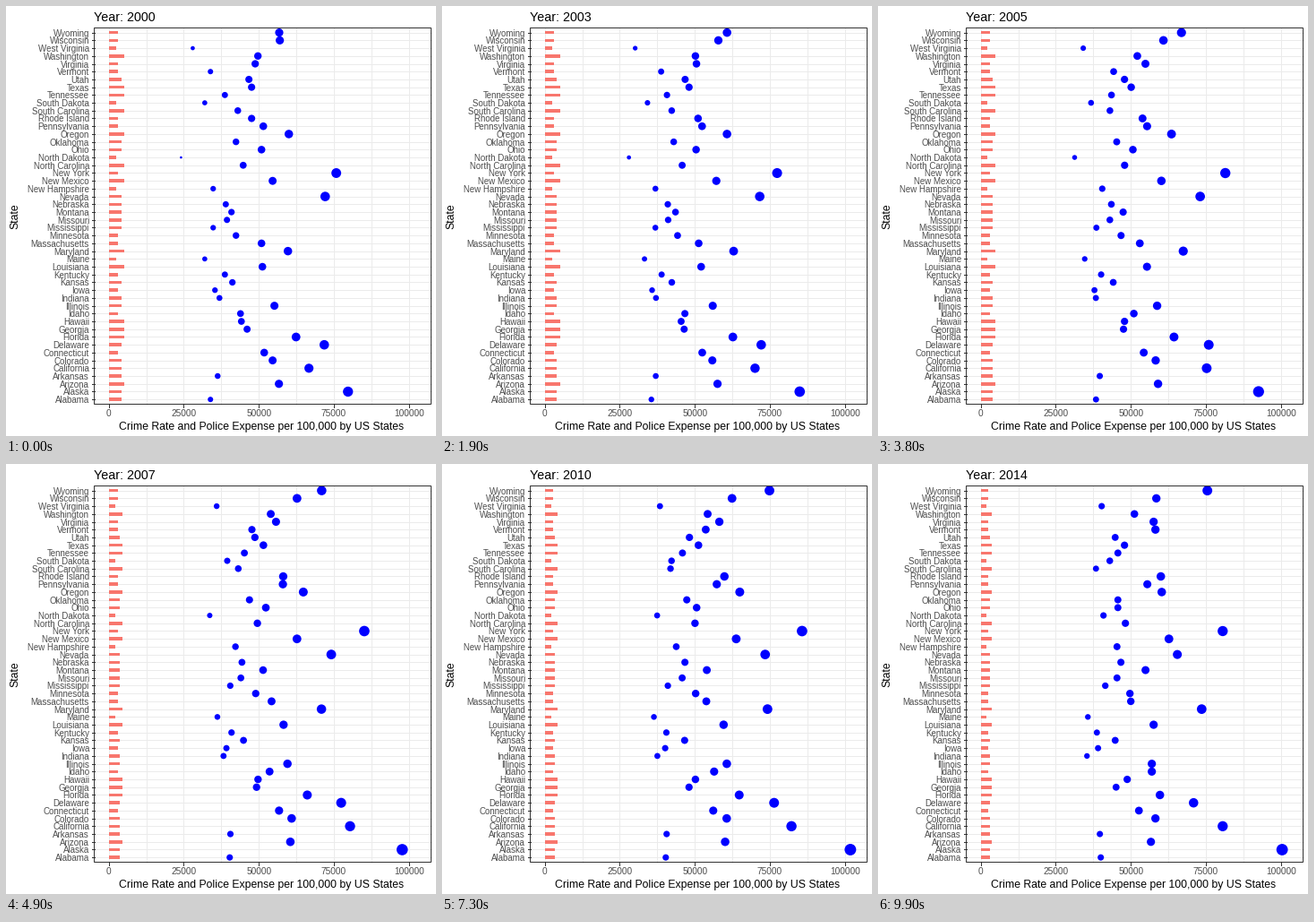
A matplotlib script that plays this animation: 480x480 px, repeating every 10000 ms.

```python
import numpy as np
import matplotlib.pyplot as plt
from matplotlib.animation import FuncAnimation
from matplotlib.patches import Rectangle

plt.rcParams["font.family"] = "Liberation Sans"

SIZE, DPI, FRAMES = 480, 72, 100
FIRST, LAST = 2000, 2014
SPAN = LAST - FIRST
LEFT, RIGHT, TOP, BOTTOM = 98.5, 474.5, 24.5, 444.5
ZERO, PER_K = 114.6, 3.352  # stage position of 0, pixels per thousand
LOW, HIGH = 24, 102         # range of the point size scale
GRID, DARK, LABEL = "#EBEBEB", "#333333", "#4D4D4D"

# Police expense in thousands: first and last year
EXPENSE = {
    "Wyoming": (56.8, 75.5), "Wisconsin": (57, 58.5), "West Virginia": (28, 40.3),
    "Washington": (49.7, 51.2), "Virginia": (48.8, 57.6), "Vermont": (33.9, 58.2),
    "Utah": (46.7, 44.8), "Texas": (47.6, 47.9), "Tennessee": (38.7, 45.7),
    "South Dakota": (32, 43), "South Carolina": (43, 38.4), "Rhode Island": (47.6, 60),
    "Pennsylvania": (51.5, 55.5), "Oregon": (60, 60.3), "Oklahoma": (42.4, 45.7),
    "Ohio": (50.9, 45.7), "North Dakota": (24.1, 40.9), "North Carolina": (44.8, 48.2),
    "New York": (75.8, 80.6), "New Mexico": (54.6, 62.7), "New Hampshire": (34.8, 45.4),
    "Nevada": (72.1, 65.5), "Nebraska": (39, 46.7), "Montana": (40.9, 54.9),
    "Missouri": (39.4, 45.4), "Mississippi": (34.8, 41.5), "Minnesota": (42.4, 49.7),
    "Massachusetts": (50.9, 50), "Maryland": (59.7, 73.6), "Maine": (32, 35.7),
    "Louisiana": (51.2, 57.6), "Kentucky": (38.7, 38.7), "Kansas": (41.2, 44.8),
    "Iowa": (35.4, 39.1), "Indiana": (36.9, 35.4), "Illinois": (55.2, 57),
    "Idaho": (43.9, 57), "Hawaii": (44.2, 48.8), "Georgia": (46.1, 45.1),
    "Florida": (62.4, 59.7), "Delaware": (71.8, 70.9), "Connecticut": (51.8, 52.7),
    "Colorado": (54.6, 58.2), "California": (66.7, 80.6), "Arkansas": (36.3, 39.7),
    "Arizona": (56.7, 56.7), "Alaska": (79.7, 100.4), "Alabama": (33.9, 40),
}
STATES = list(EXPENSE)

# Crime rate in thousands at the start, by tier; all others are average
AVERAGE = 4.2
TIERS = {
    2.4: "West Virginia, South Dakota, North Dakota, New Hampshire, Maine",
    3.2: "Wyoming, Wisconsin, Virginia, Vermont, Rhode Island, Pennsylvania, New York, "
         "Minnesota, Massachusetts, Kentucky, Iowa, Idaho, Connecticut",
    5.2: "Washington, Texas, Tennessee, South Carolina, Oregon, North Carolina, "
         "New Mexico, Maryland, Louisiana, Hawaii, Georgia, Florida, Arizona",
}
CRIME = {s: rate for rate, names in TIERS.items() for s in names.split(", ")}

STEP = (BOTTOM - TOP) / (len(STATES) + 0.2)
ROWS = TOP - 0.08 + STEP * (0.6 + np.arange(len(STATES)))


def yearly_expense():
    """Trend, a swell peaking around 2008 and a little seeded wander."""
    start, end = np.array(list(EXPENSE.values())).T
    u = np.linspace(0, 1, SPAN + 1)[:, None]
    swell = 4.2 * (start / 50) ** 1.5 * np.sin(np.pi * u ** 1.38) ** 2
    wander = np.random.default_rng(8).normal(0, 0.6, (SPAN + 1, len(STATES)))
    return start + (end - start) * u + swell + wander * np.sin(np.pi * u)


def yearly_crime():
    """A slow, then steeper decline that is larger for high rates."""
    start = np.array([CRIME.get(s, AVERAGE) for s in STATES])
    u = np.linspace(0, 1, SPAN + 1)[:, None]
    return start - (0.4 * start - 0.5) * u ** 1.7


def tween(yearly):
    """Linear motion between years, one row per frame."""
    t = np.linspace(0, SPAN, FRAMES)
    return np.array([np.interp(t, np.arange(SPAN + 1), col) for col in yearly.T]).T


def dot_area(value):
    """Point size grows with the square root of the value."""
    size = 1 + 5 * np.sqrt(np.clip((value - LOW) / (HIGH - LOW), 0, 1))
    radius = 0.375 * (size * 2.845 + 0.945) - 0.3
    return (2 * radius) ** 2


expense = tween(yearly_expense())
crime = tween(yearly_crime())

fig = plt.figure(figsize=(SIZE / DPI, SIZE / DPI), dpi=DPI, facecolor="white")
ax = fig.add_axes([0, 0, 1, 1])
ax.axis("off")

# Grid, ticks and labels
for n in range(9):
    value = n * 12.5
    x = ZERO + value * PER_K
    ax.plot([x, x], [TOP, BOTTOM], color=GRID, lw=1, zorder=1)
    if n % 2 == 0:
        ax.plot([x, x], [BOTTOM, BOTTOM + 3], color=DARK, lw=1)
        ax.text(x, 458, f"{value * 1000:.0f}", size=10.1, color=LABEL, ha="center")
for y, state in zip(ROWS, STATES):
    ax.plot([LEFT, RIGHT], [y, y], color=GRID, lw=1, zorder=1)
    ax.plot([LEFT - 3, LEFT], [y, y], color=DARK, lw=1)
    ax.text(93, y + 4, state, size=9.8, color=LABEL, ha="right")
ax.add_patch(Rectangle((LEFT, TOP), RIGHT - LEFT, BOTTOM - TOP, fill=False,
                       ec=DARK, lw=1, snap=False, zorder=5))
ax.text(285.5, 473, "Crime Rate and Police Expense per 100,000 by US States",
        size=12.2, ha="center")
ax.text(10, 234.5, "State", size=12.2, rotation=90, ha="center", va="center")
title = ax.text(98, 17, "", size=14.3)

rects = ax.barh(ROWS, crime[0] * PER_K, left=ZERO, height=0.4 * STEP,
                color="#F8766D", lw=0, antialiased=False, zorder=3)
points = ax.scatter(ZERO + expense[0] * PER_K, ROWS, c="#0000FF",
                    linewidths=0, zorder=4)
ax.set(xlim=(0, SIZE), ylim=(SIZE, 0))


def draw(i):
    title.set_text(f"Year: {round(FIRST + SPAN * i / (FRAMES - 1))}")
    for rect, rate in zip(rects, crime[i]):
        rect.set_width(rate * PER_K)
    points.set_offsets(np.column_stack([ZERO + expense[i] * PER_K, ROWS]))
    points.set_sizes(dot_area(expense[i]))
    return [title, points, *rects]


anim = FuncAnimation(fig, draw, frames=FRAMES, interval=100,
                     repeat=True, repeat_delay=0)
plt.show()
```
